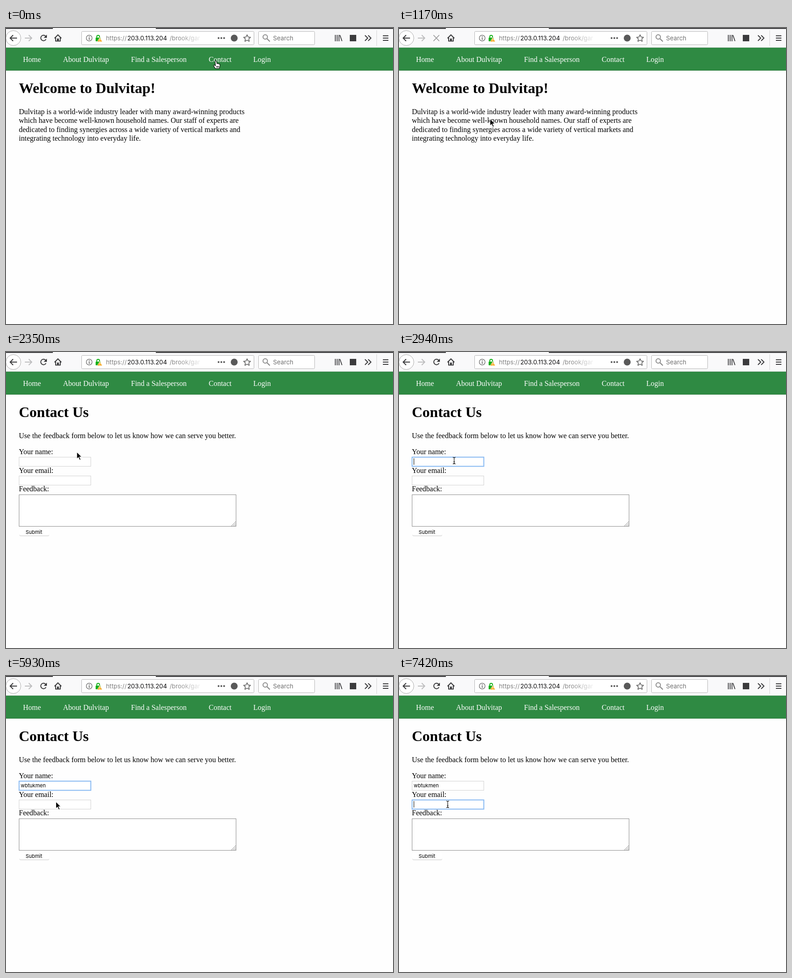
These frames come from a looping animation (842 by 646 pixels, 8 s). An HTML page:

```html
<!DOCTYPE html>
<html lang="en">
<head>
<meta charset="utf-8">
<title>Contact form</title>
<style>
  html, body { margin: 0; width: 100%; height: 100%; overflow: hidden; background: #fefefe; }
  svg { display: block; }
  text { white-space: pre; }
  .serif { font: 16px "Liberation Serif", serif; }
  .title { font: bold 32px "Liberation Serif", serif; }
  .ui { font: 13.3px Inter, sans-serif; }
  .small { font: 11px Inter, sans-serif; }
  .line { fill: none; stroke: #3b3b3d; stroke-width: 2; }
  .field { fill: #fff; stroke: #d2d2d2; }
  .focus { stroke: #86b8f2; stroke-width: 2; }
</style>
</head>
<body>
<svg width="842" height="646" viewBox="0 0 842 646">
  <defs>
    <linearGradient id="fade" gradientUnits="userSpaceOnUse" x1="375" x2="424">
      <stop stop-color="#858585"/><stop offset="1" stop-color="#858585" stop-opacity="0.1"/>
    </linearGradient>
  </defs>

  <!-- Browser toolbar -->
  <rect width="842" height="43" fill="#f9f9fa"/>
  <path d="M0 1H102M326 1H842" stroke="#38383a" stroke-width="2"/>
  <path id="tabLine" d="M102 1H255" stroke="#cfe4fb" stroke-width="2"/>
  <path d="M0 42.5H842" stroke="#c9cfca"/>
  <circle cx="16" cy="22" r="16.3" fill="#fff" stroke="#aaa"/>
  <path class="line" d="M24 22H9M15.500 15.500L9 22L15.500 28.500"/>
  <path class="line" d="M41 22H56M49.500 15.500L56 22L49.500 28.500" style="stroke:#bdbdbe"/>
  <g id="reload">
    <path class="line" d="M86.700 18.500A6 6 0 1 0 87 24.500"/>
    <path d="M89 14.500V21.500H82Z" fill="#3b3b3d"/>
  </g>
  <path id="stop" class="line" d="M75 15.500L87.500 28.500M87.500 15.500L75 28.500" style="stroke-width:1.800"/>
  <path class="line" d="M105.500 22.500L113 15L120.500 22.500M108 21V28.500H118V21"/>
  <path d="M111 23h4v6h-4z" fill="#3b3b3d"/>

  <rect x="164.500" y="7.500" width="375" height="29" rx="2" fill="#fff" stroke="#b6b6b7"/>
  <circle cx="181" cy="22" r="6.300" fill="none" stroke="#6a6a6a" stroke-width="1.300"/>
  <path d="M181 18v2M181 21v5" stroke="#6a6a6a" stroke-width="1.700"/>
  <path d="M197.500 22v-3a3 3 0 0 1 6 0v2" fill="none" stroke="#14b01a" stroke-width="2"/>
  <rect x="195" y="21" width="11" height="8" rx="1" fill="#14b01a"/>
  <path d="M204 20.500L209.500 30H198.500Z" fill="#f6a821" stroke="#fff" stroke-width=".7"/>
  <path d="M204 23.500v3M204 27.500v1.300" stroke="#fff" stroke-width="1.300"/>
  <g class="ui">
    <text x="217.500" y="27" fill="#808080">https://</text>
    <text x="264" y="27" fill="#0c0c0d">203.0.113.204</text>
    <text x="356" y="27" fill="url(#fade)">/brook/gar</text>
    <rect x="424" y="9" width="26" height="26" fill="#fff"/>
    <rect x="549.500" y="7.500" width="122" height="29" rx="2" fill="#fff" stroke="#b6b6b7"/>
    <text x="581" y="27" fill="#707070">Search</text>
  </g>
  <g fill="#595959">
    <circle cx="462.500" cy="22" r="2"/><circle cx="468.500" cy="22" r="2"/><circle cx="474.500" cy="22" r="2"/>
    <circle cx="496.500" cy="22" r="7.500"/>
  </g>
  <path d="M524.500 14.800L526.800 19.700L532 20.300L528.200 23.900L529.200 29.200L524.500 26.600L519.800 29.200L520.800 23.900L517 20.300L522.200 19.700Z"
    fill="none" stroke="#595959" stroke-width="1.500" stroke-linejoin="round"/>
  <path class="line" d="M568 23.500L574 29.500" style="stroke:#808080"/>
  <circle cx="564" cy="19.500" r="4.800" fill="none" stroke="#808080" stroke-width="1.800"/>
  <path class="line" d="M716.500 15V29M720.500 15V29M724.500 15V29M726.500 15.500L731 28.500" style="stroke-width:1.800"/>
  <rect x="748" y="15" width="14" height="14" fill="#3b3b3d"/>
  <path class="line" d="M781 16L787 22L781 28M788 16L794 22L788 28"/>
  <path d="M806.500 5V39" stroke="#d3d3d4"/>
  <path class="line" d="M820 17H832M820 22H832M820 27H832"/>

  <!-- Site navigation -->
  <rect y="43" width="842" height="50" fill="#2f8a43"/>
  <path d="M0 92.500H842" stroke="#297a3a"/>
  <g class="serif" fill="#fff">
    <text x="37" y="74">Home</text>
    <text x="124" y="74">About Dulvitap</text>
    <text x="272" y="74">Find a Salesperson</text>
    <text x="441" y="74">Contact</text>
    <text x="538" y="74">Login</text>
  </g>

  <g id="home" class="serif">
    <text class="title" x="28" y="142">Welcome to Dulvitap!</text>
    <text x="28" y="188">Dulvitap is a world-wide industry leader with many award-winning products</text>
    <text x="28" y="207">which have become well-known household names. Our staff of experts are</text>
    <text x="28" y="227">dedicated to finding synergies across a wide variety of vertical markets and</text>
    <text x="28" y="246">integrating technology into everyday life.</text>
  </g>

  <g id="contact" class="serif">
    <text class="title" x="28" y="142">Contact Us</text>
    <text x="28" y="188">Use the feedback form below to let us know how we can serve you better.</text>
    <text x="28" y="223">Your name:</text>
    <text x="28" y="264">Your email:</text>
    <text x="28" y="304">Feedback:</text>
    <rect id="nameField" class="field" x="28.500" y="229.500" width="156" height="20"/>
    <rect id="emailField" class="field" x="28.500" y="270.500" width="156" height="20"/>
    <text id="typed" class="small" x="32" y="243"></text>
    <path id="caret" d="M0 0V14" stroke="#000"/>
    <rect x="28.500" y="311.500" width="472" height="69" fill="#fff" stroke="#8c8c8c"/>
    <path d="M490 380L500 370M493.500 380L500 373.500M497 380L500 377" stroke="#8c8c8c"/>
    <rect x="29" y="386" width="65" height="16" rx="3.500" fill="#d9d9d9"/>
    <rect x="29" y="384.500" width="65" height="16" rx="3.500" fill="#fff"/>
    <text class="small" x="42.700" y="397">Submit</text>
  </g>

  <!-- Pointers, hot spot at 0,0 -->
  <g id="arrow">
    <path d="M0 0V15.500L3.600 12.200L6.200 18L8.800 16.800L6.200 11.200H11Z" fill="#000" stroke="#fff" stroke-width="1.200"/>
  </g>
  <path id="hand" d="M-2 0.500Q-.3-1.500 1 .5L2 6Q4 4.500 4.700 6.200Q6.700 5 7 7.200Q9 6.500 8.700 9L7 16.500H-1.500L-5.300 10.500Q-5.700 8 -3 9.200L-1.300 10.500Z M1.300 11v3.500M3.300 11v3.500M5.300 11v3.500"
    fill="#fff" stroke="#000" stroke-width="1.100" stroke-linejoin="round"/>
  <path id="beam" d="M-3-7.300Q0-7.300 0-5V5Q0 7.300-3 7.300M3-7.300Q0-7.300 0-5V5Q0 7.300 3 7.300M-1.500 2.500H1.500"
    fill="none" stroke="#000" stroke-width="1.100"/>
</svg>

<script>
  const LOOP = 8000, USER = "wbtukmen";
  const $ = id => document.getElementById(id);
  const show = (id, on) => $(id).style.display = on ? "" : "none";
  const latest = (list, t) => list.filter(step => step[0] <= t).pop();

  const keyTimes = [3690, 3840, 4590, 4740, 4890, 5190, 5340, 5480];
  const caretSteps = [[0, 0], [2940, 1], [3540, 0], [3990, 1], [4590, 0], [4890, 1],
    [5190, 0], [5480, 1], [5780, 0], [6370, 1], [6820, 0], [7420, 1]];
  const pointerSteps = [
    [1170, 198, 198, "arrow"], [2350, 154, 218, "arrow"], [2500, 134, 228, "arrow"],
    [2640, 123, 236, "beam"], [2790, 120, 237, "beam"], [5780, 115, 256, "arrow"],
    [5930, 108.5, 274, "arrow"], [6080, 107, 279, "beam"], [6220, 106, 280, "beam"]
  ];

  function pointer(t) {
    if (t >= 1170) return latest(pointerSteps, t).slice(1);
    const step = t < 290 ? 0 : Math.floor((t - 290) / 146.6) + 1;
    const p = step / 7, ease = p * p * (3 - 2 * p);
    const x = 457 - 259 * ease, y = 72 + 126 * ease;
    return [x, y, x > 440 && y < 93 ? "hand" : "arrow"];
  }

  function draw(t) {
    const loaded = t >= 1320, stopping = t >= 440 && t < 1460;
    show("home", !loaded);
    show("contact", loaded);
    show("tabLine", loaded && t < 1610);
    show("stop", stopping);
    show("reload", !stopping);
    $("stop").style.opacity = loaded ? 0.28 : 0.5;
    $("reload").style.opacity = t < 1460 || t >= 1910 ? 1 : t < 1610 ? 0.35 : 0.6;

    const inEmail = t >= 6370;
    $("nameField").classList.toggle("focus", t >= 2940 && !inEmail);
    $("emailField").classList.toggle("focus", inEmail);
    const typed = $("typed");
    typed.textContent = USER.slice(0, keyTimes.filter(k => k <= t).length);
    show("caret", latest(caretSteps, t)[1]);
    const caretX = inEmail || !typed.textContent ? 32.5 : Math.round(32 + typed.getComputedTextLength()) + 0.5;
    $("caret").setAttribute("transform", `translate(${caretX} ${inEmail ? 273 : 232})`);

    const [x, y, kind] = pointer(t);
    for (const id of ["arrow", "hand", "beam"]) show(id, id === kind);
    $(kind).setAttribute("transform", `translate(${x} ${y})`);
  }

  function tick() {
    draw(performance.now() % LOOP);
    requestAnimationFrame(tick);
  }
  tick();
</script>
</body>
</html>
```
